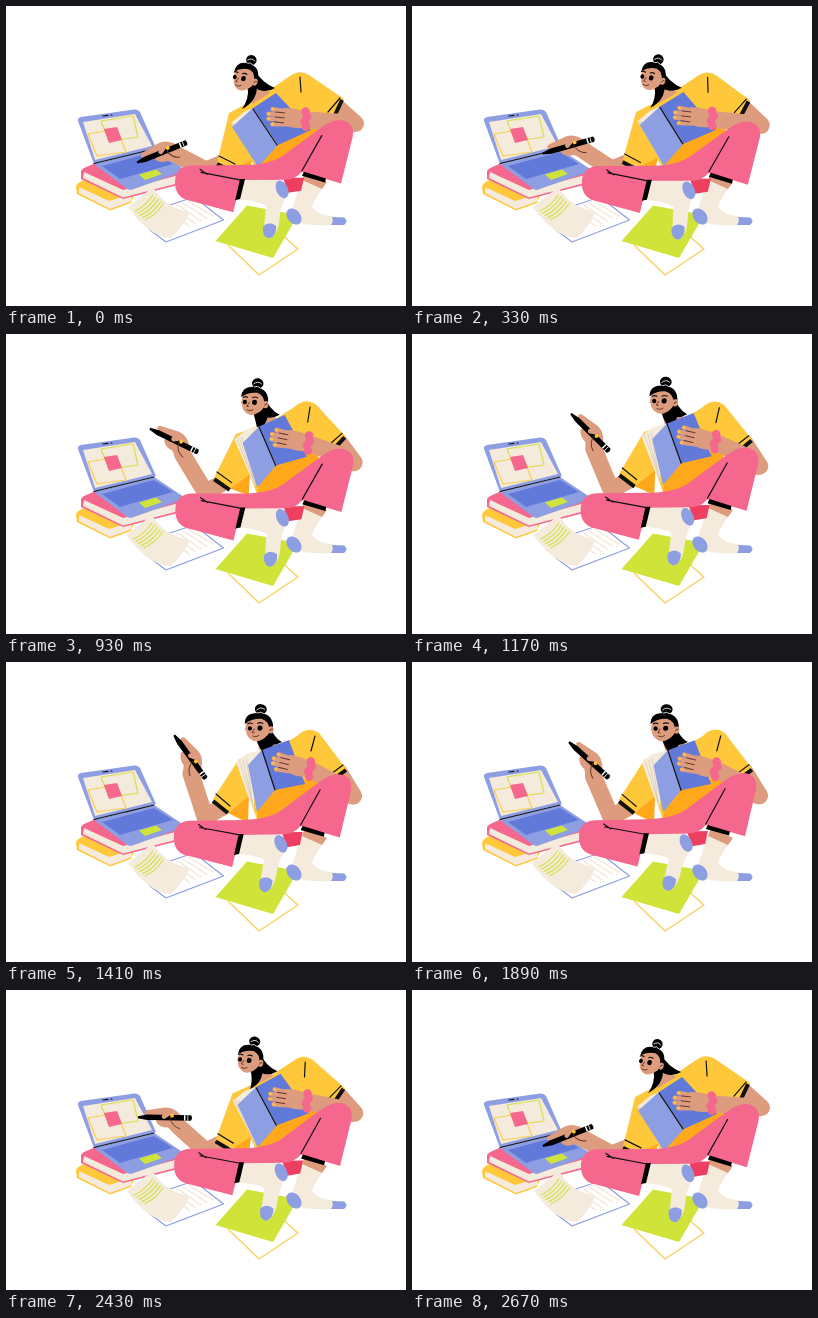
These frames come from a looping animation (400x300 px, 2700 ms). An HTML page:

```html
<!DOCTYPE html>
<html lang="en">
<head>
<meta charset="utf-8">
<title>Studying</title>
<style>
  html, body { margin: 0; width: 100%; height: 100%; overflow: hidden; background: #fff; }
  svg { display: block; width: 100vw; height: 100vh; }
  .cream { fill: #f4ebdc; } .pink { fill: #f5678d; } .yellow { fill: #ffc83b; }
  .orange { fill: #ffa81c; } .lime { fill: #cfe339; } .red { fill: #ef3f60; }
  .blue { fill: #8e9ee2; } .navy { fill: #6179d8; } .skin { fill: #dd9c7d; } .white { fill: #fff; }
  .line { fill: none; stroke: #111; stroke-width: 1.2; stroke-linecap: round; stroke-linejoin: round; }
  .gold { stroke: #f8cf52; } .leaf { stroke: #d6e04a; } .sky { stroke: #8e9ee2; }
  .sand { stroke: #efe6d6; } .page { stroke: #d9c9ae; stroke-width: .7; }
  .crease { stroke: #5d3328; stroke-width: .9; }
  .limb { stroke: #dd9c7d; stroke-width: 17; }
  .finger { stroke: #dd9c7d; stroke-width: 4.6; }
  .hem { stroke-width: 4; stroke-linecap: butt; }
</style>
</head>
<body>
<svg viewBox="0 0 400 300">
  <g id="books">
    <path class="yellow" d="M70 181Q70 177 80 173L112 189L128 190L125 197L104 204.500L71 188Z"/>
    <path class="cream" d="M73 181L103 195L126 188V195L104 203L73 187Z"/>
    <path class="pink" d="M75 165Q76 162 90 157L130 177L178 164L172 179L117 193L75 173Z"/>
    <path class="cream" d="M78 166L117 184L173 169L171 177.500L117 191.500L77 172Z"/>
  </g>
  <g id="laptop">
    <path class="blue" d="M72 115Q71 112 75 111L128 103.500Q132 103 134 106L150 142L88 158Z"/>
    <path class="cream" d="M77 116L129 108L146 140L89 154Z"/>
    <path class="line" d="M97 110L102 109.300M105 109H106"/>
    <path class="line gold" d="M82 128L111 123L120 146L91 150Z"/>
    <path class="line leaf" d="M95 115L127 110L132 131L103 135Z"/>
    <path class="pink" d="M98 123L111 121L116 134L103 137Z"/>
    <path class="blue" d="M88 158L148 143L178 163Q178 165 176 166L125 184Q122 184 120 182Z"/>
    <path class="navy" d="M96 160L148 146L167 158L114 173Z"/>
    <path class="lime" d="M133 168.500L150 163.500L156 168L139 174Z"/>
    <path class="line" d="M88 157.500L148 143"/>
  </g>
  <path class="line sky white" d="M140 207L188 191L217.500 214L160 236L144 224Z"/>
  <g id="hatch"></g>
  <g id="sheet">
    <path class="cream" d="M122 201Q136 190 147 181Q159 202 184 206Q176 222 165 232Q143 231 122 201Z"/>
  </g>
  <path class="line gold" d="M222 239L253 269L292 243L264 218Z"/>
  <path class="lime" d="M241 199.500L292 209L267 252L209.500 235Z"/>
  <g id="far-foot">
    <path class="cream" d="M296 173L317 182Q310 190 306 201Q312 209 325 210L339 212Q342 218 337 219Q312 220 297 218Q284 216 285 205Q291 190 294 177Z"/>
    <ellipse class="blue" rx="6.500" ry="9" transform="translate(288 210.500) rotate(-40)"/>
    <path class="blue" d="M326 211L338 211.500Q343 215 338 219H325Q328 215 326 211Z"/>
    <path class="skin" d="M299 166L321 176L316 183L296 174Z"/>
  </g>

  <path id="left-arm" class="line limb"/>
  <path id="right-arm" class="line limb"/>
  <g id="shirt"></g>
  <g id="hair"></g>
  <g id="head">
    <path class="skin" d="M-12-8L-13.500 3L-12 4Q-12 8-8 11Q-3 15 3 12Q11 8 13-2L11-11Z"/>
    <path d="M-14-3Q-15-15 0-15Q14-15 14.500-1L11 1Q10-8 2-9.500Q-8-9-14-3Z"/>
    <ellipse class="skin" cx="12.500" cy="1" rx="2.800" ry="3.600"/>
    <path class="line crease" d="M11.500 2Q12-1 14 0"/>
    <g id="features">
      <circle cx="-8.500" cy="1" r="2.200"/><circle cx="1.500" cy="0" r="2.600"/>
      <path class="line" d="M-11-3.500Q-9-5-6.500-4M-1-4.500Q1-6 4-5"/>
      <path class="line crease" d="M-4 1L-6 5H-4M-5 8.500Q-2 10 1 7.500"/>
    </g>
    <ellipse cx="1" cy="-19" rx="6" ry="5"/>
    <path class="line" style="stroke:#fff;stroke-width:.8" d="M-3-18Q1-22 5-19M-2-15Q1-17 4-15"/>
  </g>
  <g id="book"></g>
  <path id="forearm" class="line limb"/>
  <g id="palm"><path class="skin" d="M0-8Q-12-11-22-9L-25 5Q-12 12 0 8Z"/></g>
  <g id="writer">
    <path class="skin" d="M20 3Q11-11 0-10L-19-7Q-23-4-18-2L-6 0L-9 4Q-6 10 3 10L11 17Z"/>
    <path d="M-27-1L-18-2.700H26Q28 0 26 2.700H-18L-27 1Z"/>
    <path class="white" d="M19-2.700H20.500V2.700H19ZM22.500-2.700H23.300V2.700H22.500Z"/>
    <path class="line finger" d="M5-5L-1-1"/>
    <path class="line crease" d="M5 0Q7 9 15 11"/>
    <circle class="yellow" cx="7" cy="-2" r="1.900"/>
  </g>
  <g id="legs">
    <path class="red" d="M278 173H299L296 186L283 188Z"/>
    <path class="cream" d="M238 174H272Q284 179 281 191L262 201Q252 195 232 194Z"/>
    <g id="foot">
      <path class="cream" d="M262 188L281 191Q276 201 276 213Q276 229 267 234Q259 232 261 220Z"/>
      <path class="blue" d="M260 222Q266 216 273 221Q274 231 267 234Q259 233 260 222Z"/>
    </g>
    <ellipse class="blue" rx="5.800" ry="9.300" transform="translate(277 184.500) rotate(-24)"/>
    <path class="pink" d="M170 177Q170 161 186 160H240Q268 160 282 148L318 122Q330 114 338 116Q350 119 348 132L336 179L297 167Q290 175 280 175H236L228 207L184 195Q170 192 170 177Z"/>
    <path d="M235 174H240L235 194L230 195ZM299 167L321 174L320 178L297 171Z"/>
    <path class="line" d="M195 164L202 169M196 167L236 175M317 131L297 166"/>
  </g>
</svg>
<script>
const LOOP = 2700, TAU = Math.PI * 2;
const TIMES = [0, 660, 930, 1410, 1890, 2430, LOOP];
const $ = id => document.getElementById(id);

// Periodic monotone cubic through one value per key time.
function curve(...v) {
  const n = v.length;
  const rate = v.map((a, i) => (v[(i + 1) % n] - a) / (TIMES[i + 1] - TIMES[i]));
  const slope = rate.map((b, i) => {
    const a = rate[(i + n - 1) % n];
    return a * b <= 0 ? 0 : 2 * a * b / (a + b);
  });
  return t => {
    let i = 0;
    while (t >= TIMES[i + 1]) i++;
    const j = (i + 1) % n, h = TIMES[i + 1] - TIMES[i], u = (t - TIMES[i]) / h, w = 1 - u;
    return w * w * (1 + 2 * u) * v[i] + u * u * (3 - 2 * u) * v[j]
      + h * u * w * (w * slope[i] - u * slope[j]);
  };
}

// How far she has turned from the laptop, and where the pen is.
const turn = curve(0, .33, .67, 1, .98, .35);
const penX = curve(156, 158, 168, 184, 177, 159);
const penY = curve(146.5, 127, 106.5, 95, 98, 127.5);
const penAngle = curve(-22, -2, 26, 54, 42, 1);
const wave = (t, period, peak) => (1 + Math.cos(TAU * (t - peak) / period)) / 2;

const mix = (a, b, k) => a + (b - a) * k;

function add(parent, cls, d) {
  const el = document.createElementNS('http://www.w3.org/2000/svg', 'path');
  el.setAttribute('class', cls);
  if (d) el.setAttribute('d', d);
  return parent.appendChild(el);
}

// Paths with the same commands, blended from writing to looking up.
const morphs = [];
function morph(el, from, to) {
  const ends = to.match(/-?[\d.]+/g).map(Number);
  morphs.push(k => {
    let i = 0;
    el.setAttribute('d', from.replace(/-?[\d.]+/g, n => mix(+n, ends[i++], k).toFixed(2)));
  });
}
const part = (id, cls, from, to) => morph(add($(id), cls), from, to);

for (let i = 0; i < 5; i++) {
  add($('hatch'), 'line sand', `M${162 + i * 5} ${203 - i * 2}l${21 + i} ${17 - i * .5}`);
  add($('sheet'), 'line leaf', `M${129 + i * 2.6} ${205 + i * 2.2}q11-5 18-16`);
}

part('shirt', 'yellow',
  'M262 85L284 70Q294 63 303 69L338 93L329 109L312 126L300 160L250 162L246 156L228 162L211 157L223 107L242 97Z',
  'M276 83L291 74Q302 63 313 71L341 108L330 117L310 122L302 160L252 160L243 135L222 151L207 137L233 97L250 92Z');
part('shirt', 'orange', 'M228 162L246 154L244 162Z', 'M222 151L243 134L242 161Z');
part('shirt', 'orange', 'M252 162L262 135L312 120L315 128L290 162Z', 'M250 161L256 130L308 115L314 128L290 162Z');
part('shirt', 'skin', 'M240 80L252 78L264 87L246 98Z', 'M250 76L266 74L274 84L254 90Z');
part('shirt', 'line',
  'M294 71L295 86M334 92L322 106M213 150L229 158',
  'M309 74L305 89M337 103L325 112M210 132L224 144');
part('shirt', 'line hem', 'M211 158L227 166M336 94L329 109', 'M207 139L222 151M340 108L329 116');

part('hair', '', 'M247 62Q256 77 269 82Q258 89 246 80Z', 'M262 57Q266 75 276 80Q266 86 254 80Z');
part('hair', '', 'M242 82L251 78Q252 95 236 103Q243 93 242 82Z', 'M250 77L266 74Q270 87 259 92Q254 88 250 77Z');

part('book', 'cream', 'M225 117L238 106L247 102L252 160Z', 'M230 100L240 92L256 88L247 148Z');
for (let i = 1; i < 4; i++)
  part('book', 'line page', `M${225 + i} 118L${250 + i} 160`, `M${230 + i * 3.5} ${100 - i}L247 ${142 + i}`);
part('book', 'blue', 'M226 121L247 102L272 139L252 161Z', 'M242 103L256 88L269 128L251 150Z');
part('book', 'navy', 'M247 102L270 87L305 124L272 139Z', 'M256 88L283 78L299 122L269 128Z');
part('book', 'line', 'M247 103L271 139', 'M256 88L269 128');

morph($('right-arm'), 'M331 101L349.500 117.500L330 116', 'M333 110L347.500 134L330 125');
morph($('forearm'), 'M300 114L330 116L346 118', 'M305 108L328 120L346 134');

// four fingers and a hair tie round the wrist
for (let i = 0; i < 4; i++) {
  const y = i * 5 - 7, x = -36 + (i - 1.4) ** 2 * 2;
  add($('palm'), 'line finger', `M-15 ${y * .8}L${x} ${y}`);
  add($('palm'), 'yellow', `M${x - 2} ${y}q2-2.500 4 0q-2 2.500-4 0`);
  if (i) add($('palm'), 'line crease', `M-29 ${y - 2.5}H-20`);
}
for (let i = 0; i < 4; i++)
  add($('palm'), 'pink', `M${-3.5 + i % 2 * 2} ${i * 5 - 8}a4.300 4.300 0 1 1 8.600 0a4.300 4.300 0 1 1-8.600 0`);

function place(id, x, y, angle = 0, scale = 1) {
  $(id).setAttribute('transform', `translate(${x} ${y}) rotate(${angle}) scale(${scale} 1)`);
}

function draw(now) {
  const t = now % LOOP, k = turn(t), rest = 1 - wave(t, LOOP, 520);
  for (const m of morphs) m(k);

  place('head', mix(239, 252.5, k), mix(72, 66, k), mix(17, 4, k), mix(.87, 1, k));
  place('features', mix(-3, 0, k), mix(1, 0, k));
  place('palm', mix(298, 302, k), mix(113.5, 107, k), mix(6, 14, k));

  // the wrist is fixed in the pen's frame, the elbow stays near the knee
  const x = penX(t), y = penY(t), a = penAngle(t), r = a * TAU / 360;
  const wx = x + 14 * Math.cos(r) - 9 * Math.sin(r), wy = y + 14 * Math.sin(r) + 9 * Math.cos(r);
  place('writer', x, y, a);
  $('left-arm').setAttribute('d', `M215 ${mix(158, 146, k)}L${mix(200, 199, k)} ${mix(164, 155, k)}L${wx} ${wy}`);

  const stretch = 1 + .045 * (1 - wave(t, LOOP / 2, 0));
  place('sheet', 184 * (1 - stretch), 0, 0, stretch);
  $('legs').setAttribute('transform', `translate(${-3 * rest} ${-1.5 * rest}) rotate(${-1.1 * rest} 170 177)`);
  $('foot').setAttribute('transform', `rotate(${12 * rest} 271 190)`);
  requestAnimationFrame(draw);
}
draw(performance.now());
</script>
</body>
</html>
```
